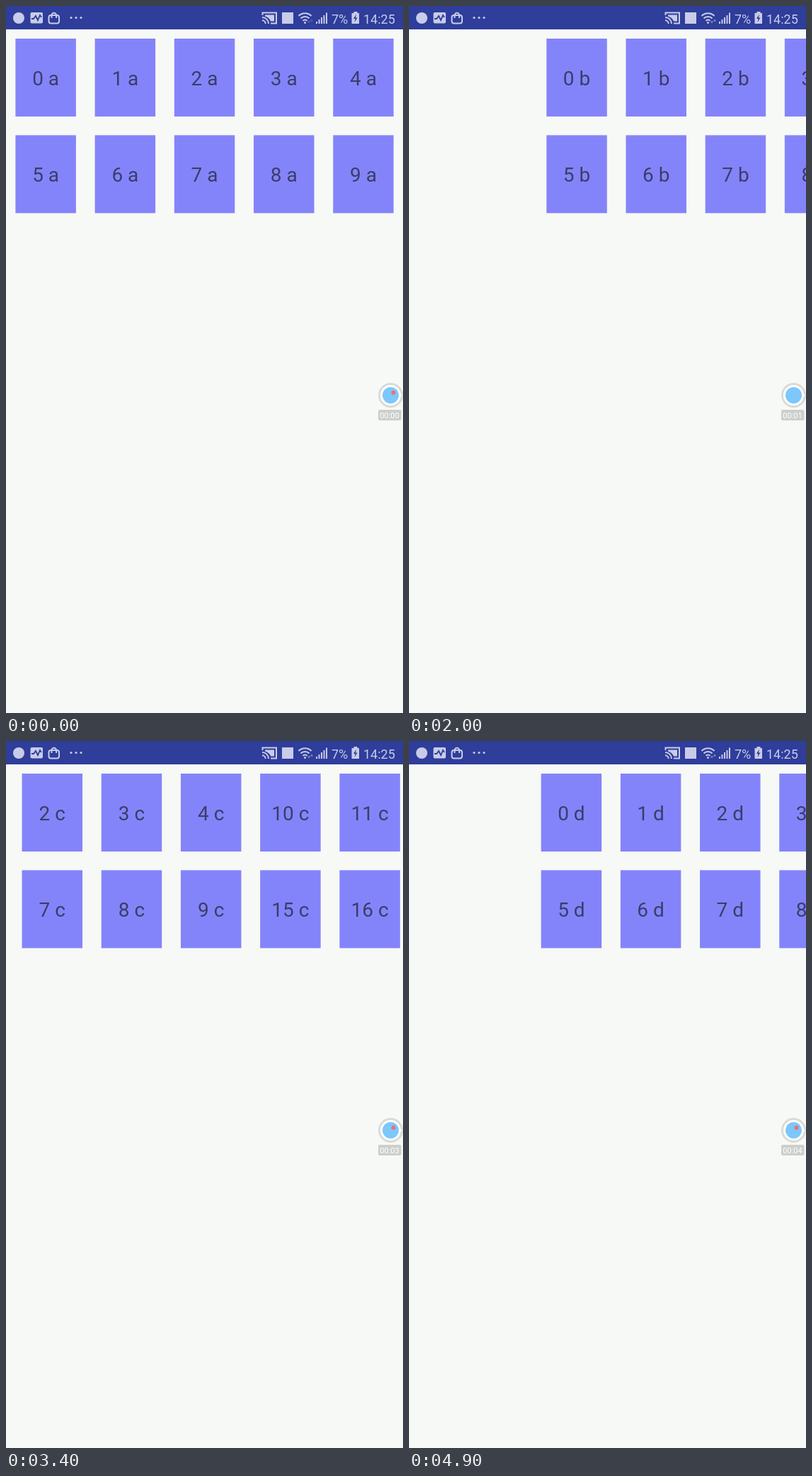
An HTML page for the animation above (5000 ms loop, 561 by 998 pixels).

```html
<!DOCTYPE html>
<html lang="en">
<head>
<meta charset="utf-8">
<title>Paged grid</title>
<style>
  html, body { margin: 0; width: 100%; height: 100%; overflow: hidden; background: #f7f9f6; }
  svg { display: block; width: 561px; height: 998px; font-family: Roboto, sans-serif; }
  .tile rect { fill: #8484fa; }
  .tile text { fill: #3a3d6b; font-size: 28px; text-anchor: middle; }
  .bar { fill: #c8cce8; font-size: 18px; }
  .line { fill: none; stroke: #c8cce8; stroke-width: 2; }
  .cut { fill: none; stroke: #2f3d9b; stroke-width: 1.8; }
  #clock { fill: #fff; font-size: 11px; text-anchor: middle; }
</style>
</head>
<body>
<svg viewBox="0 0 561 998">
  <rect width="561" height="998" fill="#f7f9f6"/>
  <g id="strip"></g>

  <rect width="561" height="33" fill="#2f3d9b"/>
  <g class="bar">
    <circle cx="18" cy="17" r="8"/>
    <rect x="34.5" y="9" width="17.5" height="15.5" rx="2"/>
    <path class="cut" d="M36 18h3l3-4 3 6 3-7 2 3"/>
    <rect class="line" x="60.5" y="13" width="14.5" height="11.5" rx="3"/>
    <path class="line" d="M64.5 17v-4a3.3 3.3 0 0 1 6.6 0v4"/>
    <circle cx="92" cy="16.5" r="1.6"/><circle cx="99" cy="16.5" r="1.6"/><circle cx="106" cy="16.5" r="1.6"/>

    <path class="line" d="M362.5 13V9.5H382V24.5H374M362 16a9 9 0 0 1 9 9M362 20.3a4.7 4.7 0 0 1 4.7 4.7"/>
    <path d="M366 12.5h13v9h-5a12 12 0 0 0-8-7z"/>
    <rect x="390" y="9" width="16" height="16"/>

    <path class="line" d="M413.5 14a12.5 12.5 0 0 1 18 0M416.5 17.5a8.2 8.2 0 0 1 12 0M419.5 20.7a4.2 4.2 0 0 1 6 0"/>
    <circle cx="422.5" cy="23.6" r="1.5"/>
    <path id="traffic" opacity=".6" d="M426 21.5h4l-2 3zM430 21.5h4l-2-3z"/>
    <path d="M438 22h2v3h-2zM441.5 19h2v6h-2zM445 16h2v9h-2zM448.5 13h2v12h-2zM452 9.500h2V25h-2z"/>
    <text x="460" y="24.500">7%</text>
    <path d="M491.500 8h5v2h2.500v15h-10.500V10h3z"/>
    <path d="M495 11.500l-4 6.500h2.500l-1 5 4-6.500h-2.500z" fill="#2f3d9b"/>
    <text x="505" y="24.500">14:25</text>
  </g>

  <circle cx="543.500" cy="549.500" r="17.500" fill="#dadbd8"/>
  <circle cx="543.500" cy="549.500" r="14.500" fill="#fff"/>
  <circle cx="543.500" cy="549.500" r="11.500" fill="#7cc7fb"/>
  <path d="M556 546l4 3.500-4 3.500z" fill="#fff"/>
  <circle id="dot" cx="547.500" cy="545.800" r="3" fill="#ee7173"/>
  <rect x="526" y="570" width="32.500" height="15" rx="2" fill="#cdcfcc"/>
  <text id="clock" x="542" y="581.500">00:00</text>
</svg>
<script>
  const PAGE = 561, COLS = 5, PER_PAGE = 10, LOOP = 5000, STEP = 100;
  const groups = { a: 13, b: 9, c: 22, d: 10 };
  // start and length of each swipe, ms
  const swipes = [[680, 560], [1783, 500], [2650, 500], [3247, 500], [4010, 470], [4679, 500]];
  const $ = id => document.getElementById(id);
  const strip = $('strip'), dot = $('dot'), clock = $('clock'), traffic = $('traffic');

  function tile(x, y, label) {
    return `<g class="tile" transform="translate(${x} ${y})">` +
      `<rect width="85.500" height="110"/><text x="42.750" y="66">${label}</text></g>`;
  }

  let page = 0, tiles = '';
  for (const [name, count] of Object.entries(groups)) {
    for (let i = 0; i < count; i++) {
      const slot = i % PER_PAGE, at = page + Math.floor(i / PER_PAGE);
      const x = at * PAGE + 13.4 + (slot % COLS) * PAGE / COLS;
      const y = 46 + Math.floor(slot / COLS) * 136.4;
      tiles += tile(x, y, `${i} ${name}`);
    }
    page += Math.ceil(count / PER_PAGE);
  }
  strip.innerHTML = tiles;

  // cubic-bezier(.4, 0, .2, 1)
  function ease(u) {
    if (u <= 0) return 0;
    if (u >= 1) return 1;
    let lo = 0, hi = 1;
    for (let i = 0; i < 24; i++) {
      const s = (lo + hi) / 2, r = 1 - s;
      if (1.2 * r * r * s + 0.6 * r * s * s + s * s * s < u) lo = s; else hi = s;
    }
    return lo * lo * (3 - 2 * lo);
  }

  function draw(now) {
    const t = Math.floor((now + 8) / STEP) * STEP % LOOP;
    const pos = swipes.reduce((sum, [start, len]) => sum + ease((t - start) / len), 0);
    strip.setAttribute('transform', `translate(${-pos * PAGE} 0)`);
    const sec = Math.max(0, Math.floor((t - 400) / 1000));
    clock.textContent = `00:0${sec}`;
    const lit = t < 950 || (t + 600) % 1000 < 550;
    dot.setAttribute('visibility', lit ? 'visible' : 'hidden');
    traffic.setAttribute('opacity', t < 600 ? 0.3 : 0.6);
  }

  function tick() {
    draw(performance.now());
    requestAnimationFrame(tick);
  }
  tick();
</script>
</body>
</html>
```
